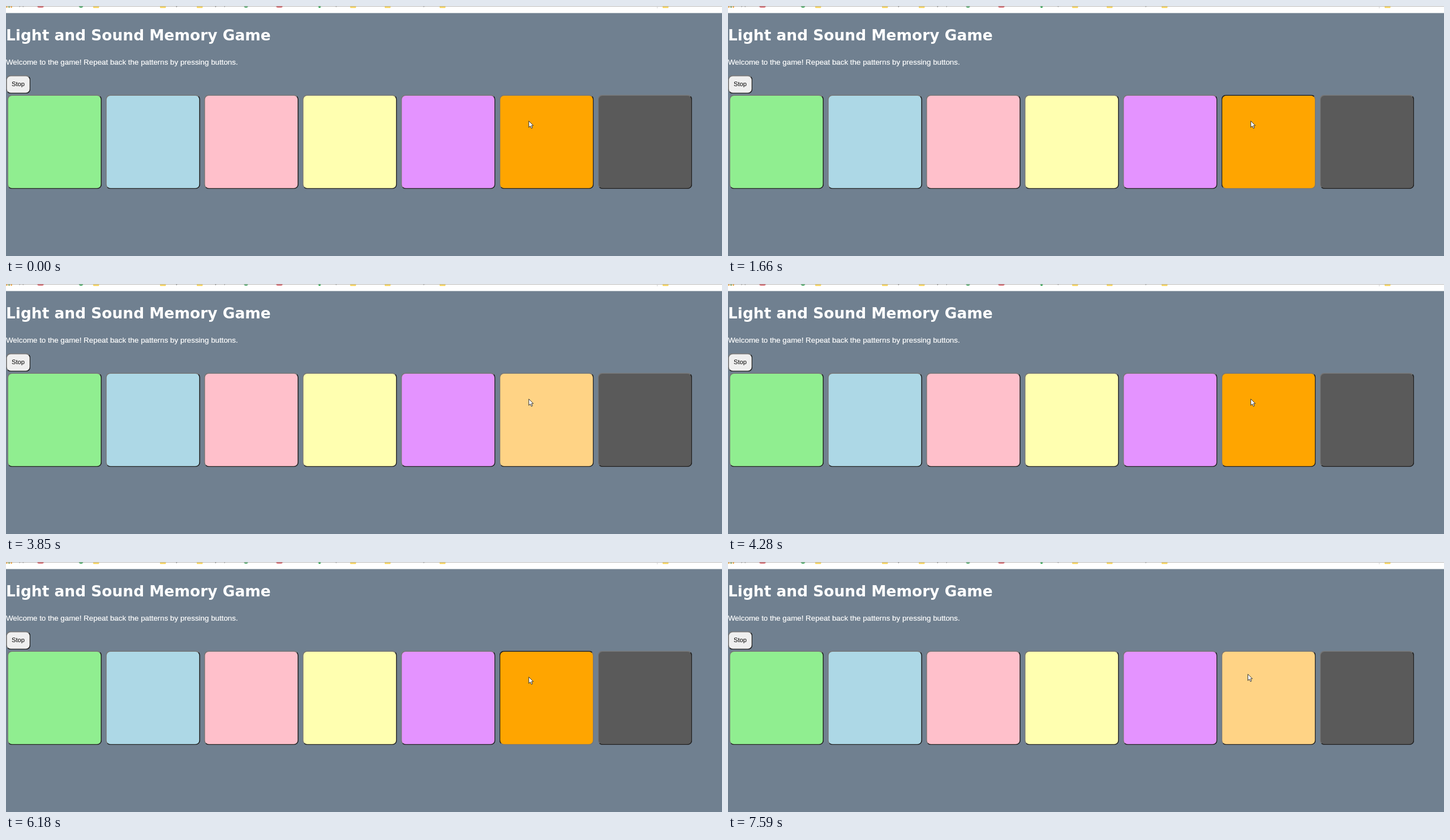
Recreate the animation shown at these times as an HTML page. Size 1265 px wide and 443 px high, loop 8000 ms.

```html
<!DOCTYPE html>
<html lang="en">
<head>
<meta charset="utf-8">
<title>Light and Sound Memory Game</title>
<style>
  html, body { margin: 0; width: 100%; height: 100%; overflow: hidden; background: #708090; }
  .button {
    position: absolute; left: 0; top: 0; box-sizing: border-box; transform-origin: 0 0;
    border: 2px outset #767676; border-radius: 10px;
  }
  svg { position: absolute; left: 0; top: 0; }
  text { font-family: "Liberation Sans", Arial, sans-serif; }
</style>
</head>
<body>
<div id="page"></div>
<svg width="1265" height="443">
  <rect width="1265" height="12.5" fill="#fff"/>
  <g id="bookmarks">
    <circle cx="1.5" cy="1.5" r="1.5" fill="#e8a33d"/>
    <circle cx="5.5" cy="1.5" r="1.5" fill="#7a9a4a"/>
    <circle cx="9.5" cy="1.5" r="1.5" fill="#f0a030"/>
    <rect x="55" y="-8" width="12" height="10.5" rx="3" fill="#c8313a"/>
    <circle cx="132.5" cy="-2" r="5" fill="#2f9e4f"/>
    <circle cx="424" cy="-1" r="4" fill="#4aa564"/>
    <rect x="477" y="-8" width="12" height="10.5" rx="3" fill="#c8313a"/>
    <circle cx="554" cy="1" r="2.2" fill="#27a049"/>
  </g>
  <rect width="1265" height="1" fill="#b8b8b8"/>
  <rect x="1150" width="1" height="4" fill="#ccc"/>
  <g fill="#fff">
    <text y="61.2" style="font: bold 26.45px 'DejaVu Sans', Verdana, sans-serif">Light and Sound Memory Game</text>
    <text y="103.6" font-size="13.37" stroke="#fff" stroke-width=".2">Welcome to the game! Repeat back the patterns by pressing buttons.</text>
  </g>
  <text x="10" y="142.3" font-size="11.13">Stop</text>
  <path id="cursor" d="M0 0V11.3L2.6 8.8 4.5 13 6.4 12.2 4.6 8.1H8Z" fill="#fff" stroke="#222" stroke-width=".9"/>
</svg>
<script>
  const LIT = '#ffa500', DIM = '#ffd385';
  const page = document.getElementById('page');
  const bookmarks = document.getElementById('bookmarks');
  const cursor = document.getElementById('cursor');

  // The page is zoomed out; each button is moved by transform to keep sub-pixel places.
  function addButton(x, y, width, height, color) {
    const el = document.createElement('div');
    el.className = 'button';
    el.style.cssText = `width: ${width}px; height: ${height}px; background: ${color};
      transform: translate(${x}px, ${y}px) scale(.835)`;
    page.append(el);
    return el;
  }
  addButton(0, 122.8, 52, 39, '#efefef');
  const colors = ['#90ee90', '#add8e6', '#ffc0cb', '#ffffb0', '#e493ff', LIT, '#5a5a5a'];
  const pads = colors.map((color, i) => addButton(2.2 + 173.87 * i, 157.3, 200, 200, color));
  const orange = pads[5];

  function addBookmark(tag, attrs, label = '') {
    const el = document.createElementNS('http://www.w3.org/2000/svg', tag);
    for (const key in attrs) el.setAttribute(key, attrs[key]);
    el.textContent = label;
    bookmarks.append(el);
  }
  for (const x of [154, 272, 337, 608, 669, 766, 1160])
    addBookmark('rect', { x, y: -6, width: 10.5, height: 9.6, rx: 1, fill: '#f7d35c' });
  for (const [x, label] of [[23, 'pp'], [300, 'y'], [369, 'y'], [385, 'p'], [582, 'p'], [737, 'p']])
    addBookmark('text', { x, y: 0, 'font-size': 11, fill: '#666' }, label);

  // start time, fill, border style, cursor shift
  const steps = [
    [0, LIT, 'outset', 0],
    [500, DIM, 'outset', 0],
    [1660, LIT, 'inset', 0],
    [1910, DIM, 'outset', 0],
    [2940, LIT, 'outset', 0],
    [3850, DIM, 'outset', 0],
    [4280, LIT, 'outset', 0],
    [5290, DIM, 'outset', 0],
    [6180, LIT, 'inset', 0],
    [6570, DIM, 'outset', 0],
    [6970, LIT, 'inset', 0],
    [7350, DIM, 'outset', 0],
    [7470, DIM, 'outset', .5],
    [7590, DIM, 'outset', 1],
  ];

  const start = performance.now();
  function draw() {
    const time = (performance.now() - start) % 8000;
    const [, fill, border, shift] = steps.findLast(step => step[0] <= time);
    orange.style.background = fill;
    orange.style.borderStyle = border;
    cursor.setAttribute('transform', `translate(${923.7 - 5.2 * shift} ${203.8 - 5 * shift})`);
    requestAnimationFrame(draw);
  }
  draw();
</script>
</body>
</html>
```
